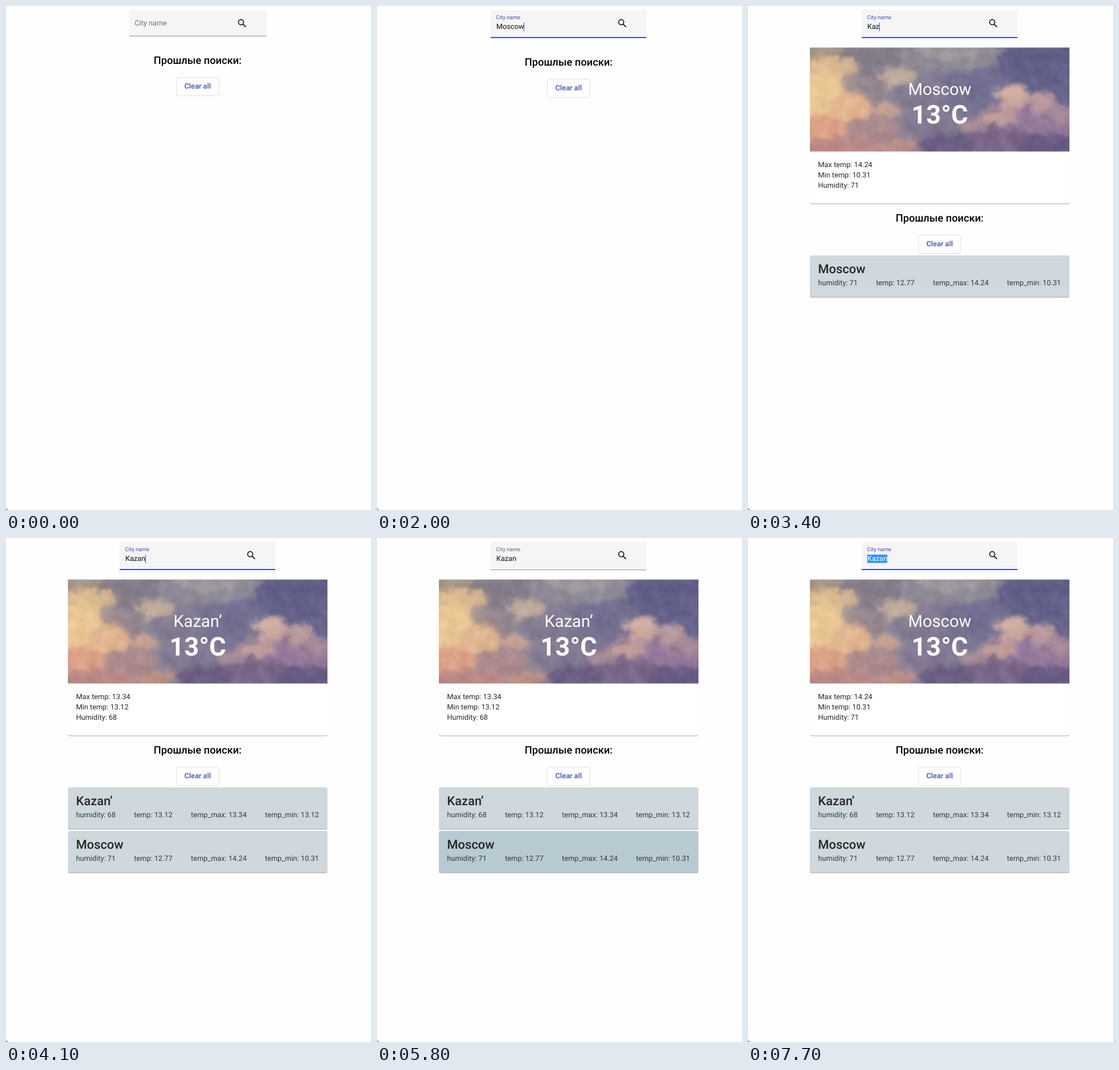
These frames come from a looping animation (637x879 px, 8000 ms). An HTML page:

```html
<!DOCTYPE html>
<html lang="ru">
<head>
<meta charset="utf-8">
<title>City weather</title>
<style>
html, body { margin: 0; width: 100%; height: 100%; overflow: hidden; background: #fefefe; }
svg { display: block; font: 12.69px Roboto, sans-serif; fill: #262626; text-rendering: geometricPrecision; }
.card { filter: drop-shadow(0 1px .6px rgba(0, 0, 0, .3)) drop-shadow(0 0 .6px rgba(0, 0, 0, .12)); }
.name { font-size: 21.75px; font-weight: 500; }
.detail { fill: #34383a; }
.medium { font-weight: 500; text-anchor: middle; }
.hero { fill: #fff; text-anchor: middle; font-size: 29px; }
.hero + .hero { font-size: 45px; font-weight: 700; }
</style>
</head>
<body>
<svg width="637" height="879" viewBox="0 0 637 879">
  <defs>
    <clipPath id="photo"><path d="M108 72.5H561V253.7H108z"/></clipPath>
    <filter id="puff" filterUnits="userSpaceOnUse" x="68" y="32" width="533" height="262" color-interpolation-filters="sRGB">
      <feTurbulence type="fractalNoise" baseFrequency=".05" numOctaves="4" seed="3" result="noise"/>
      <feGaussianBlur in="SourceGraphic" stdDeviation="5"/>
      <feDisplacementMap in2="noise" scale="22" xChannelSelector="R" yChannelSelector="G" result="cloud"/>
      <feColorMatrix in="noise" values="1 0 0 0 0  1 0 0 0 0  1 0 0 0 0  0 0 0 0 1"/>
      <feComposite in2="cloud" operator="arithmetic" k2=".1" k3="1" k4="-.05"/>
    </filter>
    <linearGradient id="sky">
      <stop stop-color="#c5a58c"/>
      <stop offset=".35" stop-color="#8f8694"/>
      <stop offset=".65" stop-color="#747091"/>
      <stop offset="1" stop-color="#625f88"/>
    </linearGradient>
  </defs>

  <g id="field">
    <path id="box" fill="#f5f5f5"/>
    <rect id="line" height="1" fill="#949494"/>
    <rect id="dark" height="2" fill="#212121"/>
    <rect id="blue" height="2" fill="#3f51b5"/>
    <g id="icon" fill="none" stroke="#111" stroke-width="2">
      <circle cx="9.5" cy="9.5" r="5.5"/>
      <path d="M13.6 13.6L19.7 19.7"/>
    </g>
    <text id="label">City name</text>
    <rect id="mark" x="208" y="29" height="14.5" fill="#3390ff"/>
    <text id="input" x="208.2" y="40"></text>
    <rect id="caret" y="29" width="1" height="15" fill="#3f51b5"/>
  </g>

  <g id="result">
    <path class="card" d="M108 72.5H561V341q0 3.5-3.5 3.5H111.5q-3.5 0-3.5-3.5z" fill="#fff"/>
    <g clip-path="url(#photo)">
      <g id="clouds" filter="url(#puff)">
        <rect x="60" y="30" width="550" height="270" fill="url(#sky)"/>
      </g>
    </g>
    <text class="hero" id="city" x="334.6" y="155"></text>
    <text class="hero" x="334.6" y="205">13°C</text>
    <text id="max" x="122.3" y="281"></text>
    <text id="min" x="122.3" y="299"></text>
    <text id="hum" x="122.3" y="317"></text>
  </g>

  <g id="past">
    <text class="medium" x="334.5" y="101" font-size="18.13" fill="#000">Прошлые поиски:</text>
    <rect x="297.5" y="124.5" width="74" height="32" rx="3.6" fill="#fff" stroke="#e0e0e0"/>
    <text class="medium" x="334.4" y="144" fill="#3f51b5">Clear all</text>
  </g>
  <g id="rows"></g>
  <path d="M0 873.5Q.5 878 4.5 879H0z" fill="#8a8a8a"/>
</svg>
<script>
const $ = id => document.getElementById(id);
const set = (el, attrs) => { for (const k in attrs) el.setAttribute(k, attrs[k]); };
const add = (parent, tag, attrs, text = '') => {
  const el = document.createElementNS('http://www.w3.org/2000/svg', tag);
  set(el, attrs);
  el.textContent = text;
  return parent.appendChild(el);
};
const show = (el, on) => { el.style.display = on ? '' : 'none'; };
const ease = x => 1 - (1 - Math.min(1, Math.max(0, x))) ** 3;
const mix = (a, b, k) => `rgb(${a.map((v, i) => Math.round(v + (b[i] - v) * k))})`;
const within = (t, spans) => spans.some(([a, b]) => t >= a && t < b);

const moscow = { name: 'Moscow', temp: '12.77', max: '14.24', min: '10.31', hum: 71 };
const kazan = { name: 'Kazan’', temp: '13.12', max: '13.34', min: '13.12', hum: 68 };
const moscowKeys = [1200, 1400, 1500, 1800, 1900, 2000];
const kazanKeys = [3000, 3200, 3400, 3600, 3700];
const caretOn = [[600, 2500], [3000, 4200], [4700, 5200], [5600, 5800], [7300, 7700]];
const selected = [[2800, 3000], [7700, 8000]];

// Sky puffs: x, y, rx, ry, colour
[
  [340, 85, 110, 30, '#8f8a96'], [350, 78, 60, 14, '#9d979c'], [215, 95, 60, 30, '#847d89'],
  [515, 100, 80, 40, '#625f88'], [400, 140, 80, 26, '#726f90'], [300, 150, 50, 30, '#827b91'],
  [130, 76, 40, 12, '#a39587'], [135, 115, 38, 26, '#dcbb90'], [125, 155, 45, 40, '#eac695'],
  [178, 105, 16, 14, '#cfb08f'], [212, 150, 26, 22, '#94858f'], [262, 124, 34, 15, '#bfaa9c'],
  [180, 180, 36, 30, '#dfb48f'], [240, 183, 28, 12, '#c5a193'], [215, 215, 50, 20, '#ab8a8e'],
  [130, 215, 45, 26, '#dca287'], [165, 248, 70, 18, '#b98886'], [265, 245, 36, 14, '#bc9188'],
  [315, 205, 45, 22, '#837892'], [345, 242, 50, 20, '#6b5e82'], [395, 208, 32, 14, '#a28a96'],
  [495, 205, 72, 44, '#94799a'], [465, 157, 28, 22, '#cdaa9e'], [508, 167, 28, 18, '#b99a9c'],
  [438, 193, 34, 16, '#c09c9a'], [542, 188, 28, 16, '#a68a98'], [440, 232, 60, 20, '#7b6789'],
  [530, 244, 60, 20, '#695c83']
].forEach(([cx, cy, rx, ry, fill]) => add($('clouds'), 'ellipse', { cx, cy, rx, ry, fill }));

const rows = [kazan, moscow].map(w => {
  const g = add($('rows'), 'g', {});
  const bg = add(g, 'rect', { class: 'card', x: 108, y: 435, width: 453, height: 72.5, rx: 3.6 });
  add(g, 'text', { class: 'name', x: 122.3, y: 466 }, w.name);
  [[122.3, 'humidity: ' + w.hum], [223.4, 'temp: ' + w.temp],
   [322.8, 'temp_max: ' + w.max], [452, 'temp_min: ' + w.min]]
    .forEach(([x, s]) => add(g, 'text', { class: 'detail', x, y: 487 }, s));
  return { g, bg };
});

function drawField(t) {
  const wide = t >= 1200;
  const left = wide ? 198.4 : 215, width = wide ? 271.6 : 240, bottom = wide ? 56 : 53;
  const float = ease((t - 580) / 400);
  const tint = t < 5800 ? float
    : t < 7300 ? 1 - ease((t - 5760) / 140)
    : ease((t - 7260) / 140);
  const focused = within(t, [[600, 5800], [7300, 8000]]);
  const hover = t < 5800 ? ease((t - 60) / 600) : ease((t - 6860) / 300);
  const grow = t < 5800 ? ease((t - 580) / 300) : tint;
  const span = width * (.5 + grow / 2);

  set($('box'), { d: `M${left} ${bottom}V10.4q0-3.6 3.6-3.6h${width - 7.2}q3.6 0 3.6 3.6V${bottom}z` });
  set($('line'), { x: left, y: bottom - 1, width });
  set($('dark'), { x: left, y: bottom - 2, width, opacity: focused && grow === 1 ? 0 : hover });
  set($('blue'), { x: left + (width - span) / 2, y: bottom - 2, width: span, opacity: focused ? grow : 0 });
  set($('icon'), { transform: `translate(${wide ? 418.4 : 402.4} 20.4) scale(.82)` });
  set($('label'), {
    transform: `translate(${left + 9.4} ${34 - 10.6 * float}) scale(${1 - .25 * float})`,
    fill: mix([112, 112, 112], [63, 81, 181], tint)
  });

  const [word, keys] = t < 3000 ? ['Moscow', moscowKeys] : ['Kazan', kazanKeys];
  const isMarked = within(t, selected);
  $('input').textContent = word.slice(0, keys.filter(k => t >= k).length);
  set($('input'), { fill: isMarked ? '#fff' : '#111' });
  const textWidth = $('input').getComputedTextLength();
  set($('mark'), { width: textWidth });
  show($('mark'), isMarked);
  set($('caret'), { x: wide ? Math.round(208.2 + textWidth) : 224 });
  show($('caret'), within(t, caretOn));
}

function drawPage(t) {
  const loaded = t >= 2300, both = t >= 4100;
  const w = both && t < 5900 ? kazan : moscow;
  show($('result'), loaded);
  $('city').textContent = w.name;
  $('max').textContent = 'Max temp: ' + w.max;
  $('min').textContent = 'Min temp: ' + w.min;
  $('hum').textContent = 'Humidity: ' + w.hum;
  set($('past'), { transform: `translate(0 ${loaded ? 275 : t >= 1200 ? 3 : 0})` });

  const hovered = [within(t, [[5300, 5500], [6400, 6500]]), within(t, [[5500, 6400]])];
  rows.forEach(({ g, bg }, i) => {
    show(g, i ? loaded : both);
    set(g, { transform: `translate(0 ${i && both ? 76 : 0})` });
    set(bg, { fill: hovered[i] ? '#b7cad2' : '#cfd8dc' });
  });
}

// The picture refreshes ten times a second.
let last = -1;
function frame() {
  const t = Math.floor(performance.now() % 8000 / 100) * 100;
  if (t !== last) {
    drawField(t);
    drawPage(t);
    last = t;
  }
  requestAnimationFrame(frame);
}
frame();
</script>
</body>
</html>
```
